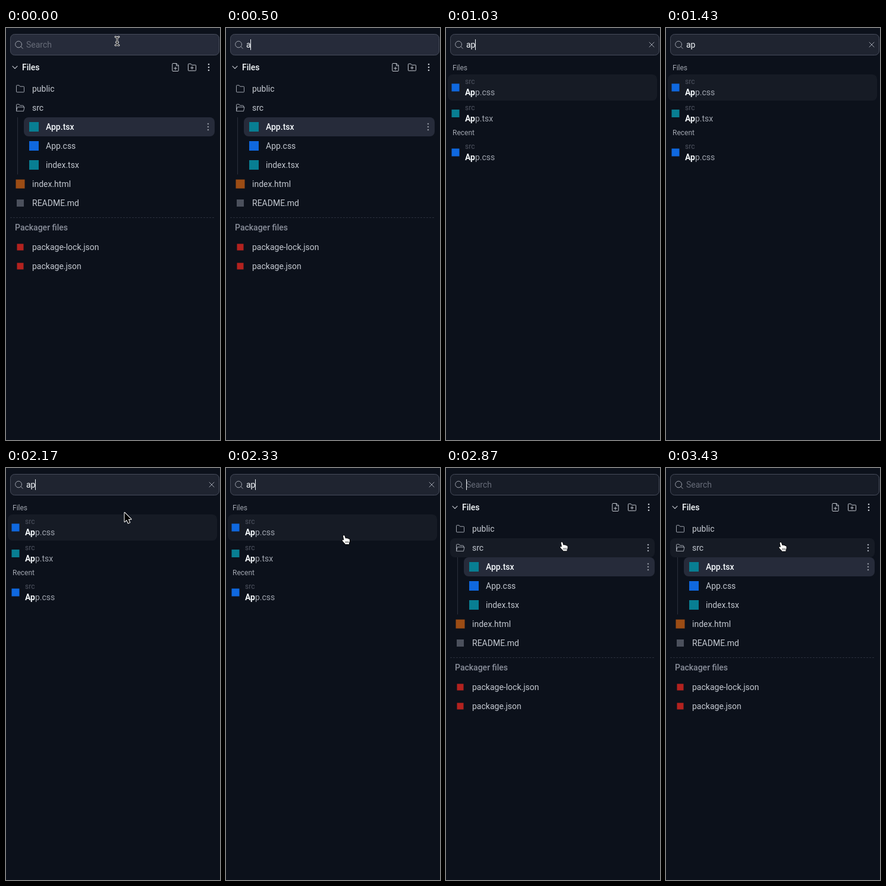
An HTML page with a canvas that plays this animation: 360 by 692 pixels, repeating every 3.46 s.

```html
<!DOCTYPE html>
<html lang="en">
<head>
<meta charset="utf-8">
<title>File search</title>
<style>
html, body { margin: 0; width: 100%; height: 100%; overflow: hidden; background: #0c111b; }
canvas { display: block; width: 360px; height: 692px; }
</style>
</head>
<body>
<canvas id="stage"></canvas>
<script>
const W = 360, H = 692, LOOP = 3460;
const canvas = document.getElementById('stage');
const ctx = canvas.getContext('2d');
const dpr = window.devicePixelRatio || 1;
canvas.width = W * dpr;
canvas.height = H * dpr;

const C = {
  bg: '#0c111b', row: '#161b25', hover: '#262b3a', line: '#2a2f3c', border: '#474c5b',
  white: '#f5f9fc', text: '#c3c8d0', soft: '#a0a5af', dim: '#8a8f9b', faint: '#4f5461', hint: '#666b78',
  ts: '#087e92', css: '#0f68df', html: '#9b4c14', npm: '#b3221f', md: '#4b505c'
};

// Times of the interaction, in ms
const T = {
  focus: 130, typeA: 500, showA: 570, typeP: 930, showP: 980,
  pointer: 1950, pick: 2800
};

const gear = () => {
  let d = '';
  for (let i = 0; i < 32; i++) {
    const a = (i + .5) * Math.PI / 16, r = i % 4 < 2 ? 6.8 : 5.2;
    d += (i ? 'L' : 'M') + (Math.cos(a) * r).toFixed(2) + ' ' + (Math.sin(a) * r).toFixed(2);
  }
  return d + 'ZM2.2 0A2.2 2.2 0 1 1-2.2 0A2.2 2.2 0 1 1 2.2 0Z';
};

// Icons are centred on 0,0
const ICON = Object.fromEntries(Object.entries({
  search: 'M4.5-.5A5.4 5.4 0 1 1-6.3-.5A5.4 5.4 0 1 1 4.5-.5M3 3.3L6.2 6.5',
  close: 'M-4-4L4 4M4-4L-4 4',
  chevron: 'M-4-1.8L0 2.2L4-1.8',
  newFile: 'M1.5-6.5H-4A1.2 1.2 0 0 0-5.2-5.3V5.3A1.2 1.2 0 0 0-4 6.5H4A1.2 1.2 0 0 0 5.2 5.3V-2.8ZV-2.8H5.2M0-.5V4.1M-2.3 1.8H2.3',
  newFolder: 'M-6.5 4.8V-4.8A1 1 0 0 1-5.5-5.8H-2L-.4-3.8H5.5A1 1 0 0 1 6.5-2.8V4.8A1 1 0 0 1 5.5 5.8H-5.5A1 1 0 0 1-6.5 4.8M0-1.4V3.2M-2.3.9H2.3',
  folder: 'M-6.5 4.8V-4.8A1 1 0 0 1-5.5-5.8H-2L-.4-3.8H5.5A1 1 0 0 1 6.5-2.8V4.8A1 1 0 0 1 5.5 5.8H-5.5A1 1 0 0 1-6.5 4.8',
  openFolder: 'M-6.5 5.3V-4.8A1 1 0 0 1-5.5-5.8H-2L-.4-3.8H4.5A1 1 0 0 1 5.5-2.8V-1.2M-6.5 5.3L-4.8-1.2H7L5.6 5.3Z',
  book: 'M-5.2 5V-5A1.5 1.5 0 0 1-3.7-6.5H5.2V6.5H-3.7A1.5 1.5 0 0 1-3.7 3.5H5.2',
  chat: 'M-6 6V-4.8A1 1 0 0 1-5-5.8H5A1 1 0 0 1 6 -4.8V2.4A1 1 0 0 1 5 3.4H-3.4Z',
  inbox: 'M-6.5.3L-4.2-4.8H4.2L6.5.3V4A1 1 0 0 1 5.5 5H-5.5A1 1 0 0 1-6.5 4ZH-2.4L-1.1 2.3H1.1L2.4.3H6.5',
  cube: 'M0-6.6L5.8-3.3V3.3L0 6.6L-5.8 3.3V-3.3ZM-5.8-3.3L0 0L5.8-3.3M0 0V6.6M-3-5L2.9-1.7',
  branch: 'M-3.2 0A1.7 1.7 0 1 1-6.6 0A1.7 1.7 0 1 1-3.2 0H-1M3.2-4H1A2 2 0 0 0-1-2V2A2 2 0 0 0 1 4H3.2M6.6-4A1.7 1.7 0 1 1 3.2-4A1.7 1.7 0 1 1 6.6-4M6.6 4A1.7 1.7 0 1 1 3.2 4A1.7 1.7 0 1 1 6.6 4',
  fan: 'M-2.5 6H2.5L3 4L6.4.2A2 2 0 0 0 5-3.2A2.2 2.2 0 0 0 2-5.4A2.4 2.4 0 0 0-2-5.4A2.2 2.2 0 0 0-5-3.2A2 2 0 0 0-6.4.2L-3 4ZM-1 5.5L-5-3M-.4 5.5L-2-5.2M.4 5.5L2-5.2M1 5.5L5-3',
  prompt: 'M-6-4.5L-2-.5L-6 3.5M0 4.5H6',
  lock: 'M-3-.8V-3.4A3 3 0 0 1 3-3.4V-.8M-4.8.3A1.2 1.2 0 0 1-3.6-.9H3.6A1.2 1.2 0 0 1 4.8.3V5.2A1.3 1.3 0 0 1 3.5 6.5H-3.5A1.3 1.3 0 0 1-4.8 5.2Z',
  screen: 'M-6.5-4.5A1 1 0 0 1-5.5-5.5H5.5A1 1 0 0 1 6.5-4.5V2A1 1 0 0 1 5.5 3H-5.5A1 1 0 0 1-6.5 2ZM0 3V6M-2.8 6H2.8',
  drum: 'M-5.6-4.3A5.6 2.2 0 0 1 5.6-4.3A5.6 2.2 0 0 1-5.6-4.3V4.4A5.6 2.2 0 0 0 5.6 4.4V-4.3M-5.6 0A5.6 2.2 0 0 0 5.6 0',
  person: 'M2.7-3.4A2.7 2.7 0 1 1-2.7-3.4A2.7 2.7 0 1 1 2.7-3.4M-5 6V4.6A2.8 2.8 0 0 1-2.2 1.8H2.2A2.8 2.8 0 0 1 5 4.6V6',
  gear: gear(),
  bug: 'M-3.4-1.2A3.4 3.4 0 0 1 3.4-1.2V2.8A3.4 3.4 0 0 1-3.4 2.8ZH3.4M0-1.2V6M-1.8-4.2L-3.2-6.2M1.8-4.2L3.2-6.2M-3.4 1H-6.6M3.4 1H6.6M-3.4-1.6L-5.8-3.4M3.4-1.6L5.8-3.4M-3.2 3.6L-5.6 5.6M3.2 3.6L5.6 5.6'
}).map(([k, d]) => [k, new Path2D(d)]));

const POINTER = {
  arrow: new Path2D('M0 0V15.2L3.5 12L6 17.6L8.7 16.4L6.3 10.9H11Z'),
  hand: new Path2D('M-2.4 1C-2.6-.8-.2-.9.3.9L1.6 5C1.9 3.8 3.5 3.8 4 5.1C4.6 4.1 6 4.4 6.3 5.7C7 5 8.4 5.6 8.5 6.8C8.7 9 8.5 10.6 7.5 12V14.2H1.2C.4 12.6-2.4 10.6-3.6 8.6C-4.3 7.2-2.6 6.5-1 7.6Z'),
  beam: new Path2D('M-3-7C-1-7 0-6.5 0-5C0-6.5 1-7 3-7M0-5V5M-3 7C-1 7 0 6.5 0 5C0 6.5 1 7 3 7M-1.5 2H1.5')
};

const TOOLS = [
  ['book', 'Docs'], ['chat', 'Chat'], ['inbox', 'Threads'], ['cube', 'Packages'],
  ['branch', 'Git'], ['fan', 'Shell'], ['prompt', 'Console'], ['lock', 'Secrets'],
  ['screen', 'Webview'], ['drum', 'Database'], ['person', 'Authentication'],
  ['md', 'Markdown'], ['gear', 'Settings'], ['bug', 'Debug']
];

// Pointer track: time, x, y
const TRACK = [
  [0, 187, 22], [300, 187, 22], [1950, 187, 24], [2040, 190, 35], [2170, 199.5, 75],
  [2300, 200, 111], [2420, 198, 122], [2560, 195.5, 125], [2760, 195.5, 125],
  [2870, 196, 125], [3030, 196, 125], [3230, 194, 125.5], [LOOP, 194, 125.5]
];

const clamp = v => Math.max(0, Math.min(1, v));
const ramp = (t, a, b) => clamp((t - a) / (b - a));
const mix = (a, b, k) => a.map((v, i) => v + (b[i] - v) * k);

function pointerAt(t) {
  const i = Math.max(1, TRACK.findIndex(p => p[0] > t));
  const [t0, ...a] = TRACK[i - 1], [t1, ...b] = TRACK[i];
  return mix(a, b, ramp(t, t0, t1));
}

function text(s, x, y, color, size = 14, weight = 400) {
  ctx.font = `${weight} ${size}px Roboto, sans-serif`;
  ctx.fillStyle = color;
  ctx.fillText(s, x, y + size * .36);
  return ctx.measureText(s).width;
}

function box(x, y, w, h, r, fill, stroke) {
  ctx.beginPath();
  ctx.roundRect(x, y, w, h, r);
  ctx.fillStyle = fill;
  ctx.fill();
  if (stroke) {
    ctx.strokeStyle = stroke;
    ctx.lineWidth = 1;
    ctx.stroke();
  }
}

function icon(name, x, y, color, width = 1) {
  ctx.save();
  ctx.translate(x, y);
  ctx.strokeStyle = color;
  ctx.lineWidth = width;
  ctx.lineJoin = ctx.lineCap = 'round';
  ctx.stroke(ICON[name]);
  ctx.restore();
}

function square(kind, x, y, size) {
  ctx.fillStyle = C[kind];
  ctx.fillRect(x - size / 2, y - size / 2, size, size);
}

function dots(x, y, color) {
  ctx.fillStyle = color;
  for (const dy of [-5, 0, 5]) {
    ctx.beginPath();
    ctx.arc(x, y + dy, 1.3, 0, 7);
    ctx.fill();
  }
}

function line(x0, y0, x1, y1, dash = []) {
  ctx.setLineDash(dash);
  ctx.strokeStyle = C.line;
  ctx.lineWidth = 1;
  ctx.beginPath();
  ctx.moveTo(x0, y0);
  ctx.lineTo(x1, y1);
  ctx.stroke();
  ctx.setLineDash([]);
}

function caretOn(t) {
  const starts = [T.focus, T.typeA, T.typeP, T.pick].filter(s => s <= t);
  return starts.length > 0 && (t - starts.pop()) % 1000 < 500;
}

function searchBar(t) {
  const query = t < T.typeA || t >= T.pick ? '' : t < T.typeP ? 'a' : 'ap';
  const warm = mix([38, 43, 58], [31, 36, 48], ramp(t, 900, 1020));
  const fill = mix(warm, [23, 28, 39], ramp(t, 2440, 2640)).map(Math.round);
  box(7.5, 10.5, 351, 35, 7, `rgb(${fill})`, C.border);

  if (t >= T.showA + 30 && t < T.showP) {
    const a = t / 110;
    ctx.strokeStyle = C.soft;
    ctx.lineWidth = 1.1;
    ctx.beginPath();
    ctx.arc(21.5, 28, 5.6, a, a + 4.4);
    ctx.stroke();
  } else {
    icon('search', 22, 28, C.soft);
  }

  const w = query ? text(query, 34, 28, C.white) : 0;
  if (!query) text('Search', 34, 28, C.hint);
  if (t >= T.showA && t < T.pick) icon('close', 346, 28, C.soft);
  if (caretOn(t)) {
    ctx.fillStyle = C.white;
    ctx.fillRect(Math.floor(34 + w), 19, 1, 18);
  }
}

function tree(t) {
  icon('chevron', 15, 66, C.text, 1.2);
  text('Files', 27, 66, C.white, 14, 500);
  icon('newFile', 285, 66, C.text);
  icon('newFolder', 313, 66, C.text);
  dots(341, 66, C.text);

  if (t >= T.pick) {
    box(7, 118, 344, 32, 8, C.row);
    dots(340, 134, C.soft);
  }
  box(30, 150, 321, 32, 8, C.hover);
  dots(340, 166, C.dim);
  line(19.5, 150, 19.5, 246);

  icon('folder', 24, 102, C.soft);
  icon('openFolder', 24, 134, C.soft);
  text('public', 44, 102, C.text);
  text('src', 44, 134, C.text);
  [['ts', 'App.tsx'], ['css', 'App.css'], ['ts', 'index.tsx']].forEach(([kind, name], i) => {
    const y = 166 + i * 32;
    square(kind, 47, y, 16);
    text(name, 67, y, i ? C.text : C.white, 14, i ? 400 : 500);
  });
  square('html', 24, 262, 15);
  text('index.html', 44, 262, C.text);
  square('md', 24, 294, 12);
  text('README.md', 44, 294, C.text);

  line(7, 318.5, 352, 318.5, [3, 2]);
  text('Packager files', 15, 335, C.dim, 14, 500);
  ['package-lock.json', 'package.json'].forEach((name, i) => {
    square('npm', 24, 368 + i * 32, 11);
    text(name, 44, 368 + i * 32, C.text);
  });
}

function suggestions() {
  text('Recent', 11, 67, C.soft, 12);
  square('html', 16, 94, 13);
  text('index.html', 32, 94, C.white, 14, 500);
  square('css', 16, 132, 13);
  text('src', 32, 122, C.faint, 12);
  text('App.css', 32, 140, C.white, 14, 500);
  text('Tools', 11, 165, C.soft, 12);
  TOOLS.forEach(([name, label], i) => {
    const y = 192 + i * 32;
    if (name === 'md') square('md', 16, y, 11);
    else icon(name, 16, y, C.soft);
    text(label, 32, y, C.soft);
  });
}

function match(kind, ext, y) {
  square(kind, 16, y + 10, 13);
  text('src', 32, y, C.faint, 12);
  const w = text('Ap', 32, y + 18, C.white, 14, 700);
  text('p.' + ext, 32 + w, y + 18, C.soft);
}

function results(t) {
  const second = t >= T.pointer && pointerAt(t)[1] >= 122;
  if (second) box(3, 122, 352, 43, 8, C.hover);
  else box(3, 78, 352, 44, 8, C.row);
  text('Files', 11, 67, C.soft, 12);
  match('css', 'css', 90);
  match('ts', 'tsx', 133.5);
  text('Recent', 11, 176, C.soft, 12);
  match('css', 'css', 199);
}

function pointer(t) {
  if (t >= T.typeA && t < T.pointer) return;
  const [x, y] = pointerAt(t);
  ctx.save();
  ctx.translate(x, y);
  ctx.lineJoin = ctx.lineCap = 'round';
  const stroke = (path, color, width) => {
    ctx.strokeStyle = color;
    ctx.lineWidth = width;
    ctx.stroke(path);
  };
  if (y < 46) {
    stroke(POINTER.beam, '#fff', 2.8);
    stroke(POINTER.beam, '#000', 1.1);
  } else {
    const hand = y >= 78, path = hand ? POINTER.hand : POINTER.arrow;
    stroke(path, hand ? '#000' : '#fff', hand ? 1.6 : 2);
    ctx.fillStyle = hand ? '#fff' : '#000';
    ctx.fill(path);
    if (hand) stroke(new Path2D('M2 9.5V12M4.1 9.5V12M6.2 9.5V12'), '#000', .7);
  }
  ctx.restore();
}

function draw(now) {
  const t = now % LOOP;
  ctx.setTransform(dpr, 0, 0, dpr, 0, 0);
  ctx.fillStyle = C.bg;
  ctx.fillRect(0, 0, W, H);
  searchBar(t);
  if (t < T.showA || t >= T.pick) tree(t);
  else if (t < T.showP) suggestions();
  else results(t);
  pointer(t);
}

let start;
function tick(now) {
  start ??= now;
  draw(now - start);
  requestAnimationFrame(tick);
}
requestAnimationFrame(tick);
</script>
</body>
</html>
```
